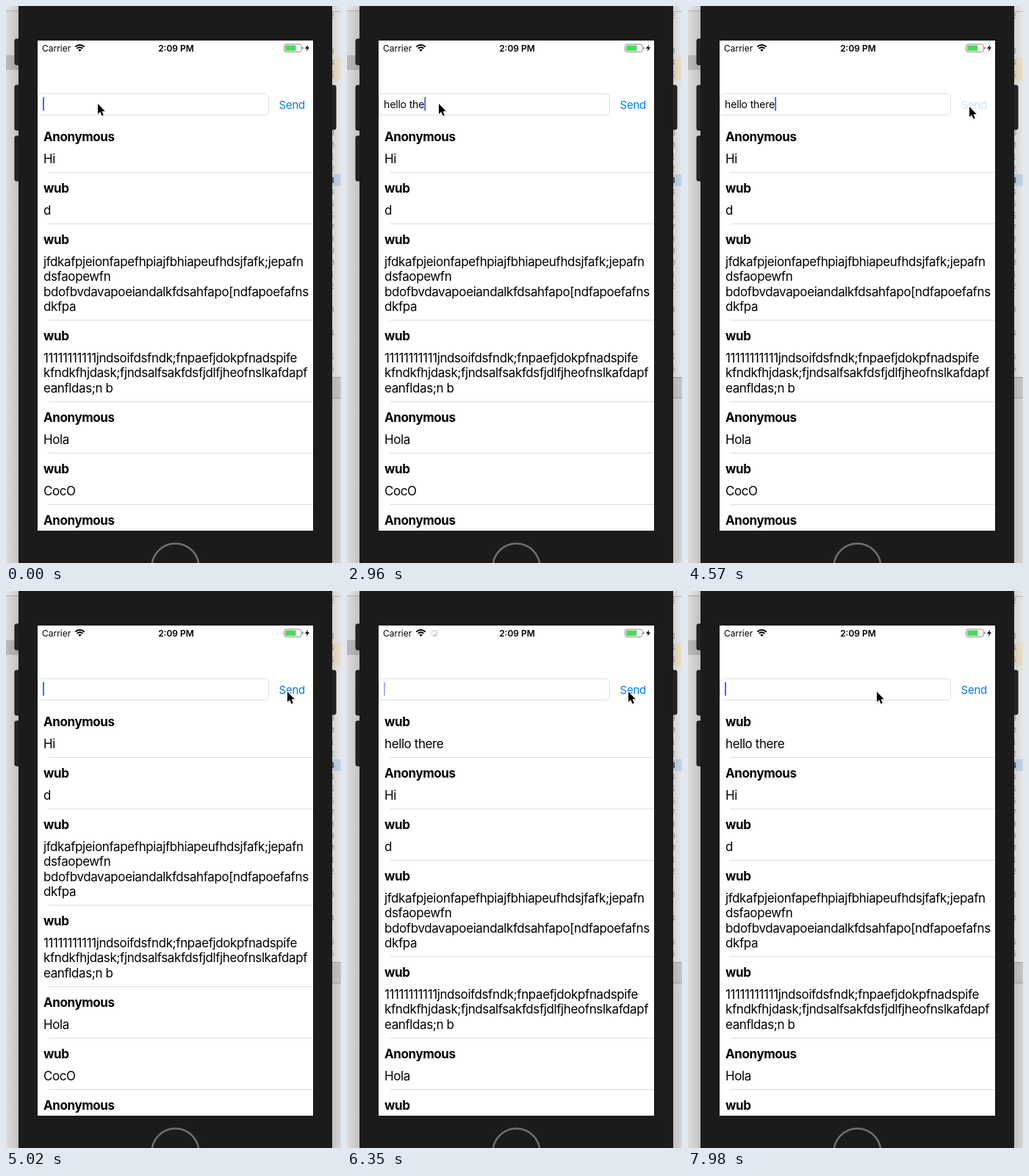
Write an HTML page with a canvas that moves like this. It is 456 px wide and 758 px high and loops after 8 s.

```html
<!DOCTYPE html>
<html lang="en">
<head>
<meta charset="utf-8">
<title>Chat</title>
<style>
html, body { margin: 0; width: 100%; height: 100%; overflow: hidden; background: #d6d6d6; }
canvas { display: block; width: 456px; height: 758px; }
</style>
</head>
<body>
<canvas id="stage"></canvas>
<script>
const W = 456, H = 758, LOOP = 8000, STEP = 147.4;
const canvas = document.getElementById('stage');
const ctx = canvas.getContext('2d');
const ratio = window.devicePixelRatio || 1;
canvas.width = W * ratio;
canvas.height = H * ratio;

const USER = 'wub', GUEST = 'Anonymous';
const oldMessages = [
  [GUEST, 'Hi'],
  [USER, 'd'],
  [USER, 'jfdkafpjeionfapefhpiajfbhiapeufhdsjfafk;jepafn', 'dsfaopewfn',
    'bdofbvdavapoeiandalkfdsahfapo[ndfapoefafns', 'dkfpa'],
  [USER, '11111111111jndsoifdsfndk;fnpaefjdokpfnadspife',
    'kfndkfhjdask;fjndsalfsakfdsfjdlfjheofnslkafdapf', 'eanfldas;n b'],
  [GUEST, 'Hola'],
  [USER, 'CocO'],
  [GUEST, '']
];
const newMessages = [[USER, 'hello there'], ...oldMessages];

// Step at which each typed character appears
const TYPED = 'hello there';
const KEY_STEPS = [8, 9, 10, 11, 12, 17, 18, 19, 20, 21, 22];
const SEND_STEP = 32, REFRESH_STEP = 43;
const BLINKS = [1, 16, 25, 36, 43, 50];
const BLINK_ALPHA = [0.5, 0, 0, 0.5];
const LOADS = [[1, 5], [8, 12], [16, 20], [24, 28], [32, 34], [36, 40], [43, 47], [50, 54]];

function rect(x, y, w, h, color) {
  ctx.fillStyle = color;
  ctx.fillRect(x, y, w, h);
}

function rounded(x, y, w, h, r, fill, stroke) {
  ctx.beginPath();
  ctx.roundRect(x, y, w, h, r);
  if (fill) { ctx.fillStyle = fill; ctx.fill(); }
  if (stroke) { ctx.strokeStyle = stroke; ctx.lineWidth = 1; ctx.stroke(); }
}

function polygon(points, fill) {
  ctx.beginPath();
  points.forEach(([x, y]) => ctx.lineTo(x, y));
  ctx.closePath();
  ctx.fillStyle = fill;
  ctx.fill();
}

function setFont(size, weight, tracking) {
  ctx.font = `${weight} ${size}px Inter, sans-serif`;
  ctx.letterSpacing = tracking + 'px';
}

function text(str, x, y, size, { weight = 400, tracking = 0, color = '#000', align = 'left' } = {}) {
  setFont(size, weight, tracking);
  ctx.textAlign = align;
  ctx.fillStyle = color;
  ctx.fillText(str, x, y);
}

function shadow(x, w, from, to) {
  const g = ctx.createLinearGradient(x, 0, x + w, 0);
  g.addColorStop(0, `rgba(0,0,0,${from})`);
  g.addColorStop(1, `rgba(0,0,0,${to})`);
  rect(x, 0, w, H, g);
}

function drawDesktop() {
  rect(0, 0, W, H, '#dcdcdc');
  rect(0, 0, 17, 6, '#e8e8e8');
  rect(0, 6, 17, 1, '#b4b4b4');
  rect(0, 67, 17, 20, '#bababa');

  rect(444, 0, 12, 505, '#efefef');
  rect(444, 7, 12, 1, '#bdbdbd');
  rect(444, 70, 12, 32, '#f3e8d0');
  rect(444, 229, 12, 16, '#cbdbee');
  rect(444, 505, 12, 28, '#cccccc');
  rect(444, 505, 12, 1, '#a8a8a8');
  rect(444, 533, 12, 1, '#a8a8a8');
  ctx.letterSpacing = '0px';
  ctx.textAlign = 'left';
  const number = (n, y, strong) => {
    ctx.font = `${strong ? 700 : 400} 10px "Noto Sans Mono", monospace`;
    ctx.fillStyle = strong ? '#28405e' : '#9a9a9a';
    ctx.fillText(n % 10, 441, y + 4);
  };
  number(2, 13);
  for (let i = 0; i < 3; i++) number(3 + i, 61 + 16 * i);
  for (let i = 0; i < 14; i++) number(9 + i, 173 + 16 * i, i === 4);
  [413, 445, 477, 493].forEach((y, i) => number(3 + i, y));

  shadow(0, 17, 0, 0.12);
  shadow(444, 12, 0.12, 0.03);
}

function drawDevice() {
  [[12, 45, 35], [12, 108, 61], [12, 177, 61], [441, 108, 60]].forEach(([x, y, h]) =>
    rounded(x, y, 8, h, 2, '#242424', '#121212'));
  rect(17, 0, 427, H, '#1b1b1b');
  ctx.beginPath();
  ctx.arc(230.5, 763.5, 32, 0, Math.PI * 2);
  ctx.strokeStyle = '#707070';
  ctx.lineWidth = 2.5;
  ctx.stroke();
}

function drawWifi() {
  ctx.strokeStyle = '#000';
  ctx.lineWidth = 2;
  [8.6, 5.3].forEach(r => {
    ctx.beginPath();
    ctx.arc(100.5, 61.6, r, -Math.PI * 0.755, -Math.PI * 0.245);
    ctx.stroke();
  });
  ctx.beginPath();
  ctx.moveTo(100.5, 62);
  ctx.arc(100.5, 62, 3.1, -Math.PI * 0.75, -Math.PI * 0.25);
  ctx.fillStyle = '#000';
  ctx.fill();
}

function drawSpinner(k) {
  const spokes = 8;
  ctx.lineWidth = 1.1;
  for (let i = 0; i < spokes; i++) {
    const a = (i + k) * Math.PI * 2 / spokes;
    ctx.strokeStyle = `rgba(70,70,70,${0.2 + 0.5 * i / spokes})`;
    ctx.beginPath();
    ctx.moveTo(118.5 + 2.4 * Math.cos(a), 57.3 + 2.4 * Math.sin(a));
    ctx.lineTo(118.5 + 4.9 * Math.cos(a), 57.3 + 4.9 * Math.sin(a));
    ctx.stroke();
  }
}

function drawStatusBar(k) {
  text('Carrier', 49, 61.5, 12);
  drawWifi();
  if (LOADS.some(([from, to]) => k >= from && k < to)) drawSpinner(k);
  text('2:09 PM', 231.5, 61.5, 12, { weight: 600, align: 'center' });
  rounded(378.5, 52, 23.5, 10.5, 2.5, null, '#8c8c8c');
  rounded(380, 53.5, 14.5, 7.5, 1, '#4cd95b');
  rounded(403, 55.5, 1.6, 3.6, 0.8, '#8c8c8c');
  polygon([[411.3, 52.5], [407, 58], [409.8, 58], [408.8, 62], [413, 56.3], [410.3, 56.3]], '#000');
}

function caretAlpha(k) {
  if (k >= 8 && k < 12) return 0.65;
  const start = BLINKS.find(b => k >= b && k < b + BLINK_ALPHA.length);
  return start === undefined ? 1 : BLINK_ALPHA[k - start];
}

function sendAlpha(k) {
  if (k === 31) return 0.2;
  if (k === 32) return 0.4;
  return k === 33 ? 0.8 : 1;
}

function drawComposer(k) {
  rounded(43.5, 119.5, 314, 29, 5, '#fff', '#dedede');
  const shown = k < SEND_STEP ? TYPED.slice(0, KEY_STEPS.filter(s => s <= k).length) : '';
  text(shown, 50, 138.5, 14, { tracking: -0.15 });
  const caretX = 50 + ctx.measureText(shown).width;
  rect(caretX, 124, 2, 18.5, `rgba(66,107,242,${caretAlpha(k)})`);
  text('Send', 371.5, 139.5, 15, { tracking: -0.24, color: `rgba(0,122,255,${sendAlpha(k)})` });
}

function drawMessages(messages) {
  let top = 156;
  for (const [name, ...lines] of messages) {
    text(name, 51, top + 27.5, 17, { weight: 700, tracking: -0.4 });
    lines.forEach((line, i) => text(line, 51, top + 58 + 20.3 * i, 17, { tracking: -0.4 }));
    top += Math.round(70 + 20.3 * (lines.length - 1));
    rect(58, top, 360, 1, '#dddddd');
  }
}

function glide(k, from, to) {
  if (k <= from) return 0;
  if (k >= to) return 1;
  const p = (k - from) / (to - from);
  return p * p * (3 - 2 * p);
}

function pointerAt(k) {
  const out = glide(k, 23, 30), back = glide(k, 48, 54);
  return [
    125 + 258 * out - 126 * back,
    133 + 4 * out + 5 * Math.sin(Math.PI * out) + 8 * Math.sin(Math.PI * back)
  ];
}

function drawPointer(k) {
  const [x, y] = pointerAt(k);
  const shape = [[0, 0], [0, 14], [3.2, 11], [5.6, 16.4], [7.8, 15.4], [5.5, 10.2], [9.8, 10.2]];
  ctx.save();
  ctx.translate(x, y);
  ctx.shadowColor = 'rgba(0,0,0,0.35)';
  ctx.shadowBlur = 2 * ratio;
  ctx.shadowOffsetY = ratio;
  polygon(shape, '#000');
  ctx.shadowColor = 'transparent';
  ctx.strokeStyle = '#fff';
  ctx.lineWidth = 2;
  ctx.lineJoin = 'round';
  ctx.stroke();
  polygon(shape, '#000');
  ctx.restore();
}

function draw(time) {
  const k = Math.floor((time % LOOP) / STEP);
  ctx.setTransform(ratio, 0, 0, ratio, 0, 0);
  drawDesktop();
  drawDevice();
  ctx.save();
  ctx.beginPath();
  ctx.rect(43, 47, 375, 667);
  ctx.clip();
  rect(43, 47, 375, 667, '#fff');
  drawStatusBar(k);
  drawComposer(k);
  drawMessages(k < REFRESH_STEP ? oldMessages : newMessages);
  ctx.restore();
  drawPointer(k);
}

const started = performance.now();
function frame() {
  draw(performance.now() - started);
  requestAnimationFrame(frame);
}
frame();
</script>
</body>
</html>
```
